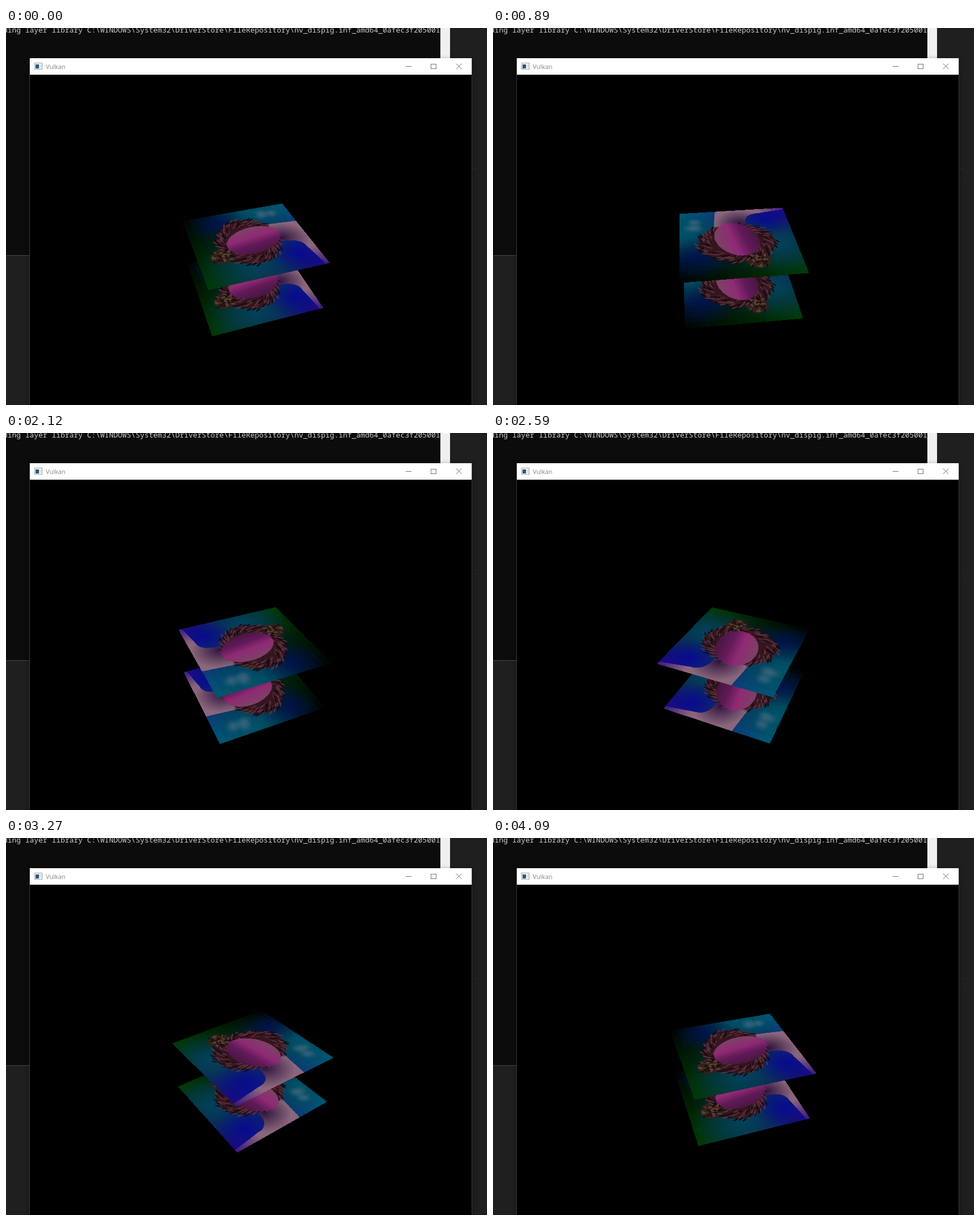
Recreate the animation shown at these times as an HTML page with a canvas. Size 846 by 662 pixels, loop 4160 ms.

```html
<!DOCTYPE html>
<html lang="en">
<head>
<meta charset="utf-8">
<title>Vulkan</title>
<style>
html, body { margin: 0; width: 100%; height: 100%; overflow: hidden; background: #1f1f1f; }
svg, canvas { position: absolute; display: block; }
svg { left: 0; top: 0; }
canvas { left: 284px; top: 300px; }
.log { font: 12.94px "Noto Sans Mono", "DejaVu Sans Mono", monospace; fill: #ccc; white-space: pre; }
.title { font: 11px "Open Sans", "Noto Sans", sans-serif; fill: #858585; }
.window { filter: drop-shadow(0 2px 5px rgba(0, 0, 0, .35)); }
</style>
</head>
<body>
<svg width="846" height="662" viewBox="0 0 846 662">
  <rect width="846" height="662" fill="#1f1f1f"/>
  <rect width="781" height="399" fill="#0c0c0c"/>
  <rect y="399" width="42" height="1" fill="#4a4a4a"/>
  <clipPath id="pane"><rect width="764" height="60"/></clipPath>
  <text class="log" x="-5" y="8" clip-path="url(#pane)">ding layer library C:\WINDOWS\System32\DriverStore\FileRepository\nv_dispig.inf_amd64_0afec3f205001</text>
  <rect x="764" width="17" height="53" fill="#f0f0f0"/>
  <path d="M820 247.5h7M820 263.5h5" stroke="#2b2b2b"/>
  <rect class="window" x="41" y="53" width="779" height="620" fill="#3a3a3a"/>
  <rect x="42" y="82" width="777" height="580" fill="#000"/>
  <rect x="42" y="53" width="777" height="29" fill="#fff"/>
  <rect x="50.5" y="61.5" width="13" height="11" fill="#f4f6f7" stroke="#9aa3a8"/>
  <rect x="52" y="64" width="6" height="7" fill="#2b5680"/>
  <path d="M59 65.5h4M59 68.5h3" stroke="#a9c4bd"/>
  <text class="title" x="70" y="72">Vulkan</text>
  <g fill="none" stroke="#737373">
    <path d="M703 67.5h10M791.5 62.5l10 9.5M801.5 62.5l-10 9.5"/>
    <rect x="747.5" y="63.5" width="9" height="8"/>
  </g>
</svg>
<canvas id="view" width="294" height="256"></canvas>
<script>
const SIZE = 256;

function makeCanvas(size) {
  const c = document.createElement('canvas');
  c.width = c.height = size;
  return c.getContext('2d', { willReadFrequently: true });
}

function randomizer(seed) {
  return () => (seed = (seed * 16807) % 2147483647) / 2147483647;
}

function glow(g, x, y, r, rgb, alpha) {
  const grad = g.createRadialGradient(x, y, 0, x, y, r);
  grad.addColorStop(0, `rgba(${rgb},${alpha})`);
  grad.addColorStop(1, `rgba(${rgb},0)`);
  g.fillStyle = grad;
  g.fillRect(x - r, y - r, 2 * r, 2 * r);
}

function oval(g, x, y, rx, ry, tilt, fill) {
  g.beginPath();
  g.ellipse(x, y, rx, ry, tilt, 0, 2 * Math.PI);
  g.fillStyle = fill;
  g.fill();
}

// Four corner colours blended, with soft patches on top.
function drawSky(g) {
  const corners = makeCanvas(2);
  ['#003800', '#000206', '#1e088c', '#005f78'].forEach((color, i) => {
    corners.fillStyle = color;
    corners.fillRect(i % 2, i >> 1, 1, 1);
  });
  g.drawImage(corners.canvas, .5, .5, 1, 1, 0, 0, 1, 1);
  glow(g, .15, .42, .45, '0,72,98', .85);
  glow(g, .95, .65, .4, '0,88,112', .8);
  glow(g, .85, .3, .28, '0,14,90', .7);
  glow(g, .2, .82, .26, '4,6,150', .8);
}

function drawClouds(g, rand) {
  for (let i = 0; i < 5; i++)
    glow(g, .85 + rand() * .1, .7 + rand() * .14, .07, '80,110,130', .45);
}

function drawNeck(g) {
  g.save();
  g.beginPath();
  g.moveTo(.4, .65);
  g.quadraticCurveTo(.43, .92, .27, .925);
  g.lineTo(0, .97);
  g.lineTo(0, 1);
  g.lineTo(.665, 1);
  g.lineTo(.7, .65);
  g.clip();
  g.fillStyle = '#8a667c';
  g.fillRect(0, 0, 1, 1);
  glow(g, .45, .77, .24, '48,20,62', 1);
  glow(g, 0, 1, .26, '50,15,125', .9);
  g.restore();
}

function drawHair(g, rand) {
  const cx = .51, cy = .48;
  oval(g, cx, cy, .33, .27, .1, '#35161f');
  oval(g, .36, .21, .1, .1, 0, '#33211c');
  for (let i = 0; i < 180; i++) {
    const turn = i * 2.4, r = .7 + rand() * .36;
    const x = cx + Math.cos(turn) * r * .33, y = cy + Math.sin(turn) * r * .27;
    oval(g, x, y, .03, .008, turn + .9, i % 2 ? '#58303a' : '#1a0a11');
  }
  for (let i = 0; i < 24; i++)
    oval(g, .3 + rand() * .13, .12 + rand() * .16, .02, .01, rand() * 3, i % 2 ? '#5c4030' : '#1a100f');
}

// Plain head, lit from shadow on the left to light on the right.
function drawHead(g) {
  const light = g.createLinearGradient(.3, .56, .7, .5);
  light.addColorStop(0, '#45153f');
  light.addColorStop(.35, '#611a58');
  light.addColorStop(.6, '#8f2a74');
  light.addColorStop(1, '#7a4463');
  oval(g, .505, .53, .255, .185, 1.25, light);
}

function drawTexture() {
  const g = makeCanvas(SIZE), rand = randomizer(77);
  g.scale(SIZE, SIZE);
  drawSky(g);
  drawClouds(g, rand);
  drawNeck(g);
  drawHair(g, rand);
  drawHead(g);
  return new Uint32Array(g.getImageData(0, 0, SIZE, SIZE).data.buffer);
}

const texels = drawTexture();
const view = document.getElementById('view').getContext('2d');
const { width, height } = view.canvas;
const image = view.createImageData(width, height);
const pixels = new Uint32Array(image.data.buffer);

// Camera at (2,2,2) looking at the centre, 45 degree field of view.
const FOCUS = 703.6, CX = 430.5 - 284, CY = 373 - 300;
const DIST = Math.sqrt(12), COS = Math.sqrt(1 / 3), SIN = Math.sqrt(2 / 3);
const BLACK = 0xff000000;

function drawPlane(z, angle) {
  const c = Math.cos(angle), s = Math.sin(angle);
  for (let y = 0; y < height; y++) {
    const v = (y + .5 - CY) / FOCUS;
    const near = (SIN * z + v * (DIST - COS * z)) / (COS + SIN * v);
    const depth = DIST - SIN * near - COS * z;
    for (let x = 0; x < width; x++) {
      const side = (x + .5 - CX) / FOCUS * depth;
      const p = near * c + side * s, q = side * c - near * s;
      const tx = .5 - (p + q) * Math.SQRT1_2, ty = .5 + (q - p) * Math.SQRT1_2;
      if (tx >= 0 && tx < 1 && ty >= 0 && ty < 1)
        pixels[y * width + x] = texels[(ty * SIZE | 0) * SIZE + (tx * SIZE | 0)];
    }
  }
}

// One turn in equal held steps; LEAD rounds step starts down to whole ticks.
const LOOP = 4160, STEPS = 61, LEAD = 4;
const START = -26.2, TURN = 5.99;

let shown = -1;
function render(now) {
  const step = Math.min(STEPS - 1, Math.floor((now % LOOP + LEAD) / LOOP * STEPS));
  if (step === shown) return;
  shown = step;
  const angle = (START + step * TURN) * Math.PI / 180;
  pixels.fill(BLACK);
  drawPlane(-.5, angle);
  drawPlane(0, angle);
  view.putImageData(image, 0, 0);
}

render(0);
const begin = performance.now();
function tick() {
  render(performance.now() - begin);
  requestAnimationFrame(tick);
}
requestAnimationFrame(tick);
</script>
</body>
</html>
```
